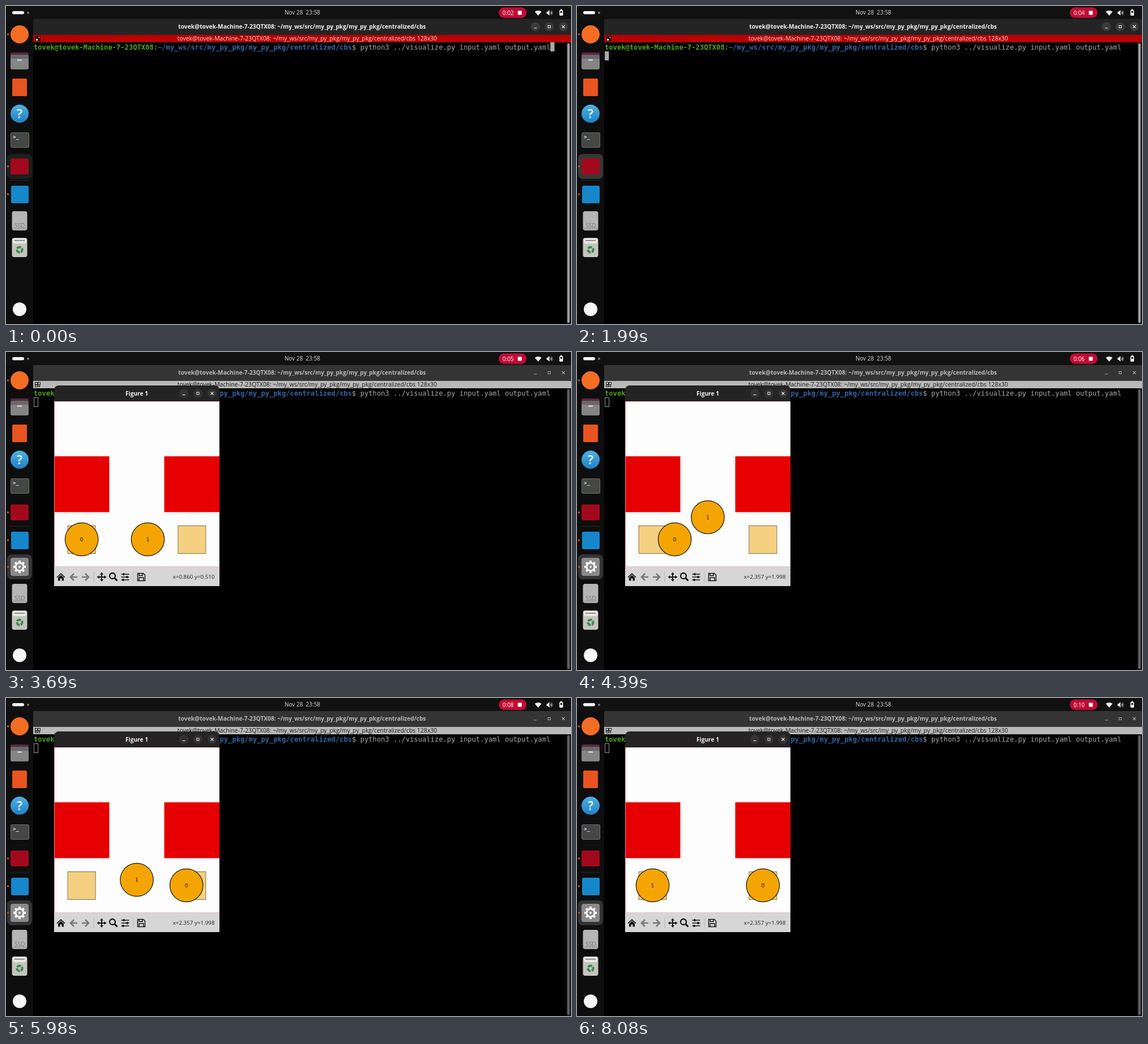
Recreate the animation shown at these times as an HTML page with a canvas. Size 998 by 561 pixels, loop 8.18 s.

```html
<!DOCTYPE html>
<html lang="en">
<head>
<meta charset="utf-8">
<title>Path planning in a terminal</title>
<style>
html, body { margin: 0; width: 100%; height: 100%; overflow: hidden; background: #000; }
canvas { display: block; }
</style>
</head>
<body>
<canvas id="stage" width="998" height="561"></canvas>
<script>
const ctx = document.getElementById('stage').getContext('2d');
const LOOP = 8180;
const ENTER_AT = 1000, MAP_AT = 2624, MAP_TIME = 200, FOCUS_AT = 2780;
const PLOT_AT = 2825, CELL_TIME = 1075;
const TICKS = [600, 1650, 2650, 3720, 4650, 5650, 6650, 7650];

const SANS = '"Open Sans", "Noto Sans", sans-serif';
const MONO = '"DejaVu Sans Mono", monospace';
const USER = 'tovek@tovek-Machine-7-23QTX08';
const PATH = '~/my_ws/src/my_py_pkg/my_py_pkg/centralized/cbs';
const COMMAND = 'python3 ../visualize.py input.yaml output.yaml';

const clamp = v => Math.max(0, Math.min(1, v));

function rect(x, y, w, h, fill) {
  ctx.fillStyle = fill;
  ctx.fillRect(x, y, w, h);
}

function frame(x, y, w, h, color) {
  ctx.strokeStyle = color;
  ctx.lineWidth = 1;
  ctx.strokeRect(x, y, w, h);
}

function round(x, y, w, h, r, fill) {
  ctx.beginPath();
  ctx.roundRect(x, y, w, h, r);
  ctx.fillStyle = fill;
  ctx.fill();
}

function disc(x, y, r, fill) {
  ctx.beginPath();
  ctx.arc(x, y, r, 0, Math.PI * 2);
  ctx.fillStyle = fill;
  ctx.fill();
}

function ring(x, y, r, color, width = 1, from = 0, to = Math.PI * 2) {
  ctx.beginPath();
  ctx.arc(x, y, r, from, to);
  ctx.strokeStyle = color;
  ctx.lineWidth = width;
  ctx.stroke();
}

function path(d, color, width) {
  const shape = new Path2D(d);
  if (width) {
    ctx.strokeStyle = color;
    ctx.lineWidth = width;
    ctx.stroke(shape);
  } else {
    ctx.fillStyle = color;
    ctx.fill(shape);
  }
}

function text(str, x, y, font, color, align = 'left') {
  ctx.font = font;
  ctx.textAlign = align;
  ctx.fillStyle = color;
  ctx.fillText(str, x, y);
  return ctx.measureText(str).width;
}

function at(x, y, scale, draw) {
  ctx.save();
  ctx.translate(x, y);
  ctx.scale(scale, scale);
  draw();
  ctx.restore();
}

function gradient(y0, y1, from, to) {
  const g = ctx.createLinearGradient(0, y0, 0, y1);
  g.addColorStop(0, from);
  g.addColorStop(1, to);
  return g;
}

function windowButtons([min, max, close], y, color, backing) {
  if (backing) [min, max, close].forEach(x => disc(x, y, 8, backing));
  path(`M${min - 2.5} ${y + 2.5}h5`, color, 1);
  frame(max - 2, y - 2, 4, 4, color);
  path(`M${close - 2.5} ${y - 2.5}l5 5m0-5l-5 5`, color, 1.1);
}

function topBar(t) {
  rect(0, 0, 998, 23, '#111');
  round(11, 9, 21, 5.5, 3, '#f6f6f6');
  disc(39, 12, 2, '#777');
  text('Nov 28  23:58', 523.5, 15, `10px ${SANS}`, '#dedede', 'center');
  round(870.5, 2.5, 49, 18.5, 9, '#c00c35');
  const seconds = 2 + TICKS.filter(tick => t >= tick).length;
  text('0:' + String(seconds).padStart(2, '0'), 877, 15.5, `10px ${SANS}`, '#fff');
  round(904, 8.5, 7, 7, 1, '#fff');
  path('M940 17l-6-7q6-4 12 0z', '#eee');
  path('M955 10h2l3-3v10l-3-3h-2z', '#eee');
  ring(960, 12, 3, '#eee', 1.2, -0.9, 0.9);
  ring(960, 12, 5.3, '#aaa', 1, -0.9, 0.9);
  round(977.5, 7, 6.5, 10, 1.5, '#eee');
  rect(979.5, 5.5, 2.5, 2, '#eee');
  rect(979, 9, 3.5, 3, '#222');
}

const icons = {
  files() {
    round(-16, -15, 32, 14, 3, '#5e2744');
    round(-16, -11, 32, 26, 3, '#686868');
    round(-16, -4, 32, 18.5, 3, '#858585');
    rect(-4, -2.5, 8, 1.8, '#eee');
  },
  help() {
    disc(0, 0, 16, gradient(-16, 16, '#4fb0e6', '#2080c4'));
    text('?', 0, 8, `600 22px ${SANS}`, '#fff', 'center');
  },
  terminal() {
    round(-16, -13, 33, 27, 3, '#6b6d6a');
    round(-15, -12, 31, 25, 2, '#454745');
    text('>_', -12, -2, `bold 9px ${MONO}`, '#eee');
  },
  settings() {
    round(-16, -16, 32, 32, 4, '#8a8a8a');
    for (let i = 0; i < 8; i++) {
      ctx.save();
      ctx.rotate(i * Math.PI / 4);
      rect(-2, -11, 4, 5, '#f4f4f4');
      ctx.restore();
    }
    ring(0, 0, 7, '#f4f4f4', 3);
    disc(0, 0, 2, '#f4f4f4');
  },
  drive() {
    round(-13.5, -17, 27, 34, 4, '#a8a8a8');
    round(-13, -17, 26, 29, 4, '#b5b5b5');
    text('SSD', 0.5, 12, `10px ${SANS}`, '#777', 'center');
  },
  trash() {
    round(-13.5, -17, 27, 34, 4, '#c4c4bf');
    round(-12, -16, 24, 9, 3, '#e6e6e3');
    rect(-9, -13, 18, 1.5, '#777');
    for (let i = 0; i < 3; i++) ring(0, 4, 4.6, '#3c8952', 4, i * 2.09 - 0.6, i * 2.09 + 1.1);
  }
};

function dock(t) {
  rect(0, 23, 48, 538, '#0e0e0e');
  const grow = clamp((t - 2600) / 190);
  const push = 47 * grow;
  if (t < MAP_AT) {
    ctx.globalAlpha = 0.4 + 0.6 * clamp(t / 400);
    round(2, 261, 44, 44, 8, '#383838');
    ctx.globalAlpha = 1;
  }
  if (t >= FOCUS_AT) round(2, 357, 44, 44, 8, '#343434');

  disc(24, 50, 16, '#f36d24');
  at(24, 97, 1, icons.files);
  round(11, 128, 26, 31, 2, '#e95420');
  at(24, 190, 1, icons.help);
  at(24, 236, 1, icons.terminal);
  round(8, 269, 32, 28, 3, '#a3091c');
  rect(7, 307, 34, 1, '#292929');
  round(9, 317, 31, 31, 3, '#1687cb');
  if (grow > 0) {
    ctx.globalAlpha = grow;
    at(24, 355.5 + push / 2, grow * grow, icons.settings);
    ctx.globalAlpha = 1;
  }
  at(24, 379 + push, 1, icons.drive);
  at(24, 426 + push, 1, icons.trash);
  [50, 283, 332].forEach(y => disc(3.5, y, 1.8, '#d5481f'));
  if (grow === 1) disc(3.5, 379, 1.8, '#d5481f');
  disc(24, 535, 12, '#f7f7f7');
}

function terminal(t) {
  const focused = t < MAP_AT;
  const active = t < FOCUS_AT;
  rect(48, 23, 950, 538, '#000');
  rect(48, 23, 950, 28, active ? '#242424' : '#343434');
  text(`${USER}: ${PATH}`, 523, 40, `bold 10.2px ${SANS}`, active ? '#f2f2f2' : '#b9b9b9', 'center');
  windowButtons([935, 959.5, 984.5], 36.5, active ? '#eee' : '#aaa', active && '#3a3a3a');

  rect(48, 51, 950, 13, focused ? '#b80000' : '#b9b9b9');
  text(`${USER}: ${PATH} 128x30`, 532, 60.5, `10.45px ${SANS}`, focused ? '#f4dada' : '#151515', 'center');
  if (focused) {
    rect(52, 53, 9, 9, '#111');
    rect(53, 58, 3, 3, '#eee');
    rect(57, 54, 3, 3, '#d33');
  } else {
    frame(51.5, 53.5, 4, 4, '#222');
    frame(56.5, 53.5, 4, 4, '#222');
    frame(51.5, 58.5, 4, 3, '#222');
    path('M58.5 57.5v5m-2.5-2.5h5', '#222', 1);
  }

  const bold = `bold 12.13px ${MONO}`, plain = `12.13px ${MONO}`;
  let x = 49;
  x += text(USER, x, 77, bold, '#4ea51c');
  x += text(':', x, 77, plain, '#aaa');
  x += text(PATH, x, 77, bold, '#3465a4');
  x += text('$ ' + COMMAND, x, 77, plain, '#aaa');

  if (t < ENTER_AT) rect(x, 64, 7.3, 16, '#aaa');
  else if (focused) rect(49, 80, 7.3, 16, '#aaa');
  else frame(49.5, 80.5, 7, 16, '#999');
  rect(990, 64, 8, 497, '#181818');
  round(991.5, 66, 4, 493, 2, focused ? '#a4a4a4' : '#626262');
}

// Position along a list of grid points, one step per unit of time.
function along(points, s) {
  const i = Math.min(Math.floor(s), points.length - 2);
  const f = clamp(s - i);
  return points[i].map((v, k) => v + (points[i + 1][k] - v) * f);
}

const CELL = 97.4;
const gridX = x => 133.6 + x * CELL;
const gridY = y => 330.5 - y * CELL;
const ROUTES = [
  [[0, 0], [0, 0], [1, 0], [2, 0]],
  [[2, 0], [1, 0], [1, 1], [1, 0], [0, 0]]
];

function plot(t) {
  const s = Math.floor((t - PLOT_AT) / CELL_TIME * 10) / 10;
  rect(85, 184, 97.5, 98.5, '#e60000');
  rect(279.5, 184, 97.5, 98.5, '#e60000');
  rect(85, 87, 1, 292, '#e98793');
  rect(85, 87, 292, 1, '#f5bfcb');
  rect(85, 378, 292, 1, '#f5bfcb');
  for (const x of [0, 2]) {
    rect(gridX(x) - 24.5, 306.5, 49, 49, '#f6d081');
    frame(gridX(x) - 24.5, 306.5, 49, 49, '#80704c');
  }
  ROUTES.forEach((route, name) => {
    const [gx, gy] = along(route, s);
    const x = gridX(gx), y = gridY(gy);
    disc(x, y, 29.2, '#f5a503');
    ring(x, y, 29.2, '#111', 1.2);
    text(name, x, y + 3, '9.5px "DejaVu Sans", sans-serif', '#111', 'center');
  });
}

function toolbarIcons(t) {
  const ink = '#151515', pale = '#77777d';
  path('M89.5 397l7.5-7 7.5 7-1 1.2-6.5-6-6.5 6zM92 398l5-4.5 5 4.5v5.5h-3.5v-4h-3v4h-3.5z', ink);
  path('M126 397h-12m6-6l-6 6 6 6', pale, 2.6);
  path('M134 397h12m-6-6l6 6-6 6', pale, 2.6);
  path('M162 397h14m-7-7v14', ink, 2);
  path('M169 388.5l3 4h-6zM169 405l3-4h-6zM160.5 397l4-3v6zM177.5 397l-4-3v6z', ink);
  ring(188, 395, 5, ink, 2.3);
  path('M192 399l4.5 4.5', ink, 3);
  path('M203.5 392h14m-14 5h14m-14 5h14', ink, 1.4);
  [[208, 392], [214, 397], [207, 402]].forEach(([x, y]) => rect(x - 1.3, y - 2, 2.6, 4, ink));
  path('M232.5 390.5h10l3 3v10h-13zM235 390.5v4h6v-4M235 403v-5h8v5', ink, 1.5);
  const coords = t < 4100 ? 'x=0.860 y=0.510' : 'x=2.357 y=1.998';
  if (t > 3300) text(coords, 368.5, 400, `9.8px ${SANS}`, '#222', 'right');
}

function figure(t) {
  if (t < MAP_AT) return;
  const p = clamp((t - MAP_AT) / MAP_TIME);
  const ease = p < 1 ? 1 - 2 ** (-10 * p) : 1;
  ctx.save();
  ctx.globalAlpha = ease;
  ctx.translate(231, 414 - ease);
  ctx.scale(ease, ease);
  ctx.translate(-231, -413);
  round(85, 59, 292, 30, [8, 8, 0, 0], '#242424');
  text('Figure 1', 231, 76.5, `bold 10.2px ${SANS}`, '#f4f4f4', 'center');
  windowButtons([314, 339, 364], 73, '#eee', '#333');
  rect(85, 87, 292, 292, '#fdfdfd');
  rect(85, 379, 292, 34, '#d6d6d6');
  rect(154.5, 388, 1, 18, '#b4b4b4');
  rect(224.5, 388, 1, 18, '#b4b4b4');
  if (t >= PLOT_AT) {
    plot(t);
    toolbarIcons(t);
  }
  ctx.restore();
}

function draw(now) {
  const t = (now - start) % LOOP;
  terminal(t);
  topBar(t);
  dock(t);
  figure(t);
  requestAnimationFrame(() => draw(performance.now()));
}

const start = performance.now();
draw(start);
</script>
</body>
</html>
```
